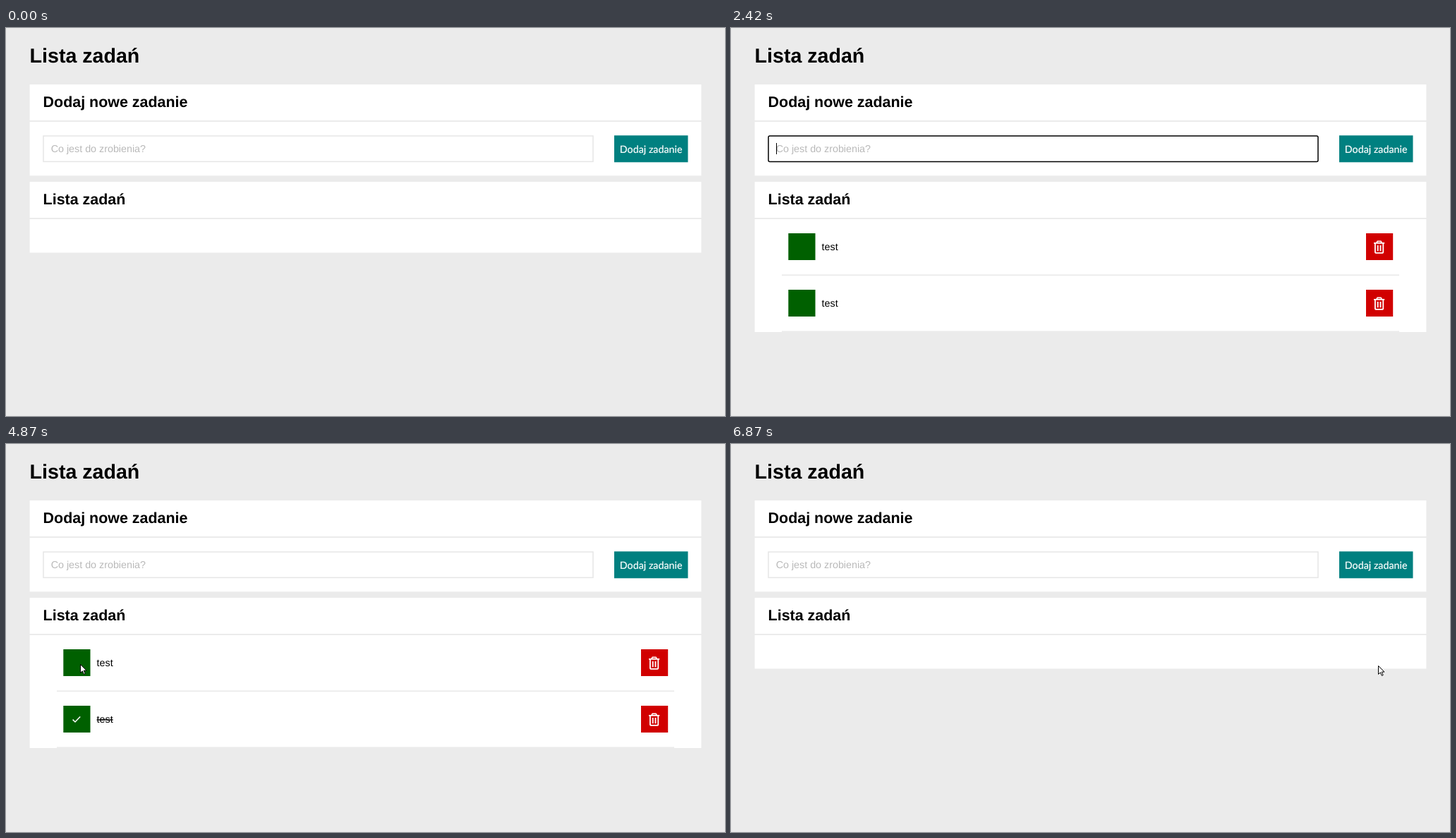
An HTML page for the animation above (6920 ms loop, 1019x550 px).

```html
<!DOCTYPE html>
<html lang="pl">
<head>
<meta charset="utf-8">
<title>Lista zadań</title>
<style>
  html, body { margin: 0; width: 100%; height: 100%; overflow: hidden; background: #ebebeb; }
  svg { display: block; width: 1019px; height: 550px; }
  text { font: 14.3px "Liberation Sans", Arial, sans-serif; text-rendering: geometricPrecision; white-space: pre; }
  .h1 { font-size: 28.6px; font-weight: bold; }
  .h2 { font-size: 21.45px; font-weight: bold; }
  .button { font-family: Lato, sans-serif; fill: #fff; stroke: #fff; stroke-width: .2; }
  .panel { fill: #fff; }
  .field { fill: #fff; stroke: #e6e6e6; stroke-width: 1.5; }
  .field.focused { stroke: #000; rx: 2px; }
  .placeholder { fill: #b9b9b9; }
  .icon { fill: none; stroke: #fff; stroke-width: 1.8; }
  .done { text-decoration: line-through; }
</style>
</head>
<body>
<svg viewBox="0 0 1019 550">
  <text class="h1" x="33.6" y="49">Lista zadań</text>

  <rect class="panel" x="33.6" y="80" width="951.8" height="51"/>
  <rect class="panel" x="33.6" y="133" width="951.8" height="76.3"/>
  <text class="h2" x="52.6" y="112.2">Dodaj nowe zadanie</text>
  <rect class="field" id="field" x="53" y="153" width="779" height="36.4"/>
  <text id="value" x="63.7" y="176"></text>
  <rect id="caret" y="163" width="1" height="16"/>
  <rect x="862" y="152.3" width="104.5" height="38" fill="#008080"/>
  <text class="button" x="869.8" y="177">Dodaj zadanie</text>

  <rect class="panel" x="33.6" y="218" width="951.8" height="51"/>
  <rect class="panel" id="list" x="33.6" y="271" width="951.8"/>
  <text class="h2" x="52.6" y="250.2">Lista zadań</text>

  <g id="rows"></g>
  <path id="cursor" d="M.5 .5V12.4L3.3 9.8L5.4 14.4L7.2 13.6L5.2 9.1H9Z" fill="#fff" stroke="#000"/>
</svg>

<script>
const LOOP = 6920;
const ROW_HEIGHT = 80;
const WORD = "test";
const HINT = "Co jest do zrobienia?";

const $ = id => document.getElementById(id);
const within = (t, from, to) => t >= from && t < to;
const clamp = (v, low, high) => Math.min(high, Math.max(low, v));
const ease = k => k * k * (3 - 2 * k);

const focus = { from: 70, to: 3760 };
const caretBlink = { from: 3010, to: 3540 };

// The first letter comes alone, the rest follow at an even pace
const entries = [
  { first: 270, next: 600, gap: 130, enter: 1130 },
  { first: 1400, next: 1680, gap: 150, enter: 2420 }
];
const items = [
  { added: 1130, checked: 3760, unchecked: 4660, removed: 6660 },
  { added: 2420, checked: 4240, unchecked: 5200, removed: 6100 }
];

// Pointer moves; sag bends the way downwards
const pointerStart = { x: 713, y: 225 };
const moves = [
  { from: 3010, to: 3480, x: 38, y: 300, sag: 15 },
  { from: 3480, to: 3700, x: 98, y: 302 },
  { from: 3760, to: 4040, x: 106, y: 391 },
  { from: 4240, to: 4600, x: 105, y: 312 },
  { from: 4860, to: 5130, x: 110, y: 388 },
  { from: 5200, to: 5690, x: 957, y: 405, sag: 28 },
  { from: 5760, to: 5960, x: 915, y: 389 },
  { from: 6380, to: 6590, x: 917, y: 314 }
];

$("rows").innerHTML = items.map((_, i) => `
  <g transform="translate(0 ${i * ROW_HEIGHT})">
    <rect x="72" y="349.4" width="875" height="1.8" fill="#ebebeb"/>
    <rect x="81.3" y="291" width="38.2" height="38" fill="#006000"/>
    <rect x="900" y="291" width="38.2" height="38" fill="#d10000"/>
    <path class="icon" d="M911 304.9H926.2M915 304.4L916.2 302.4H921L922.2 304.4
      M912.9 305V317.2Q912.9 318.9 914.6 318.9H922.6Q924.3 318.9 924.3 317.2V305
      M916.7 308V316.3M920.5 308V316.3"/>
    <path class="icon tick" d="M94.6 310.6L98 314L105.2 306.6" style="stroke-width:1.5"/>
    <text class="label" x="128.6" y="315">${WORD}</text>
  </g>`).join("");
const rows = [...$("rows").children];

function show(el, visible) {
  el.setAttribute("visibility", visible ? "inherit" : "hidden");
}

function lettersTyped(t) {
  const entry = entries.find(e => within(t, e.first, e.enter));
  if (!entry) return 0;
  const later = Math.floor((t - entry.next) / entry.gap) + 1;
  return 1 + clamp(later, 0, WORD.length - 1);
}

function drawField(t) {
  const focused = within(t, focus.from, focus.to);
  const typed = lettersTyped(t);
  const value = $("value");
  value.textContent = typed ? WORD.slice(0, typed) : HINT;
  value.classList.toggle("placeholder", !typed);
  $("field").classList.toggle("focused", focused);
  const width = typed ? value.getComputedTextLength() : 0;
  $("caret").setAttribute("x", Math.round(63.7 + width));
  show($("caret"), focused && !within(t, caretBlink.from, caretBlink.to));
}

function drawList(t) {
  let count = 0;
  items.forEach((item, i) => {
    const present = within(t, item.added, item.removed);
    const done = within(t, item.checked, item.unchecked);
    count += present;
    show(rows[i], present);
    show(rows[i].querySelector(".tick"), done);
    rows[i].querySelector(".label").classList.toggle("done", done);
  });
  $("list").setAttribute("height", count ? count * ROW_HEIGHT : 47.5);
}

function drawPointer(t) {
  let { x, y } = pointerStart;
  for (const move of moves) {
    const k = ease(clamp((t - move.from) / (move.to - move.from), 0, 1));
    x += (move.x - x) * k;
    y += (move.y - y) * k + (move.sag || 0) * Math.sin(Math.PI * k);
  }
  show($("cursor"), t >= moves[0].from);
  $("cursor").setAttribute("transform", `translate(${Math.round(x)} ${Math.round(y)})`);
}

const start = performance.now();
function tick() {
  const t = (performance.now() - start) % LOOP;
  drawField(t);
  drawList(t);
  drawPointer(t);
  requestAnimationFrame(tick);
}
tick();
</script>
</body>
</html>
```
